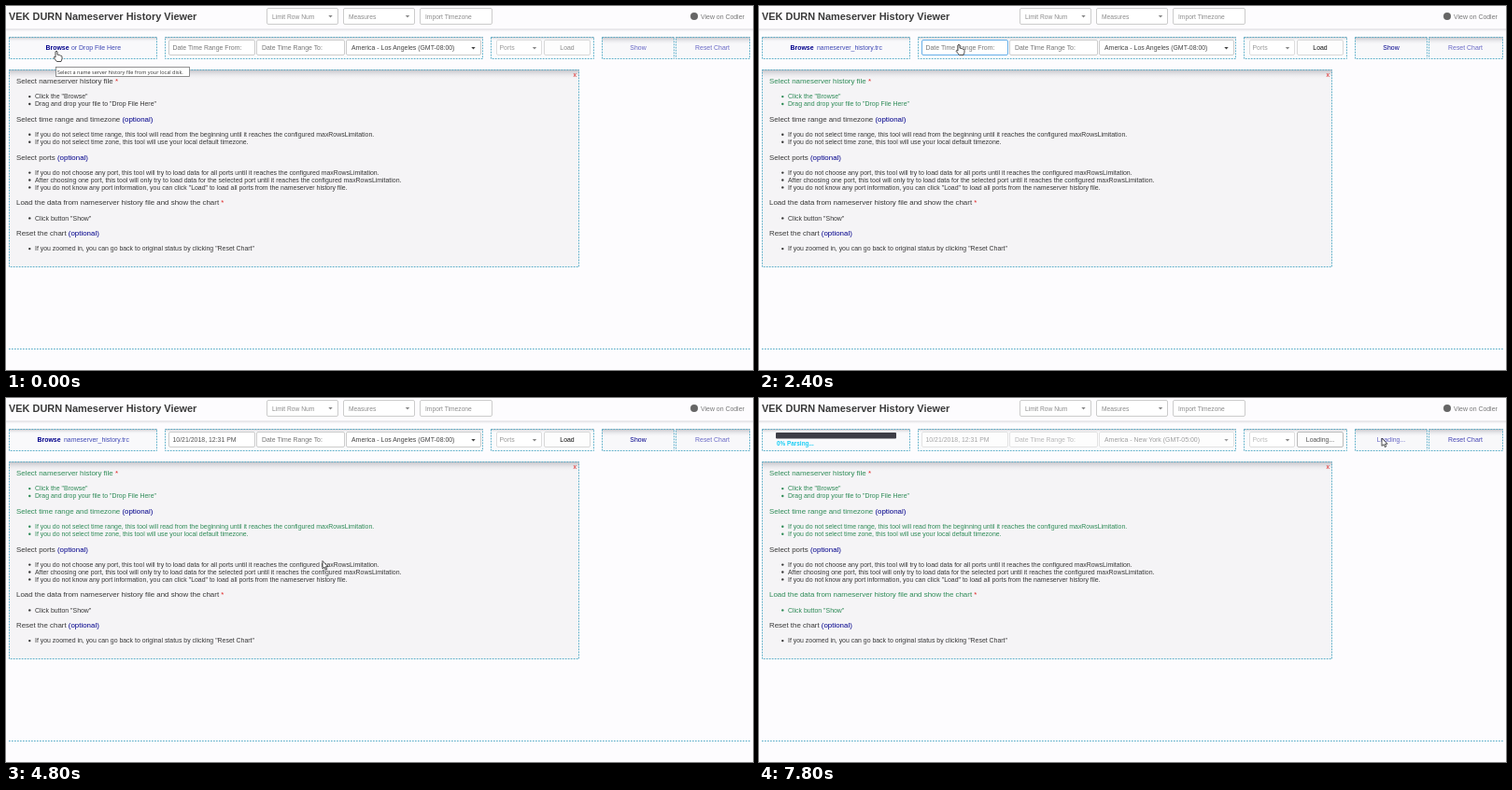
Write an HTML page that moves like this. It is 800 px wide and 390 px high and loops after 8000 ms.

```html
<!DOCTYPE html>
<html lang="en">
<head>
<meta charset="utf-8">
<title>Nameserver History Viewer</title>
<style>
  html, body { margin: 0; width: 100%; height: 100%; overflow: hidden; background: #fdfcfe; }
  svg { display: block; width: 100%; height: 100%; font-family: "Liberation Sans", Arial, sans-serif; }
  .ui { font-family: "Open Sans", "Noto Sans", sans-serif; }
  .serif { font-family: "Liberation Serif", Times, serif; }
  .bold { font-weight: bold; }
  .mid { text-anchor: middle; }
  .end { text-anchor: end; }
  .dash { fill: none; stroke: #58adc8; stroke-dasharray: 1.7 1.3; }
</style>
</head>
<body>
<svg id="stage" viewBox="0 0 800 390"></svg>
<script>
const LOOP = 8000, STEP = 200;
const NAVY = '#00008b', BLUE = '#3f48b5', GREEN = '#2e8b57', INK = '#383838', GREY = '#8c8c8c';
const FILE = 'nameserver_history.trc', STAMP = '10/21/2018, 12:31 PM';
const stage = document.getElementById('stage');

// Moments at which the interface changes
const at = { dialog: 600, pick: 1000, loaded: 1800, focus: 2200, calendar: 2600, month: 3400, day: 4000,
  set: 4600, zones: 5200, type: 6000, chosen: 6800, busy: 7600 };

// time, x, y, shape
const track = [
  [0, 52, 48, 'hand'], [400, 52, 48, 'hand'], [600, 56, 40, 'arrow'], [1000, 62, 16, 'arrow'],
  [1200, 62, 16, 'arrow'], [1600, 289, 217, 'arrow'], [1800, 289, 217, 'arrow'], [2400, 212, 41, 'hand'],
  [2600, 212, 41, 'hand'], [3000, 181, 62, 'hand'], [3400, 181, 62, 'hand'], [3800, 190, 157, 'hand'],
  [4000, 190, 157, 'hand'], [4400, 282, 304, 'hand'], [4600, 282, 304, 'arrow'], [5000, 396, 45, 'arrow'],
  [5200, 402, 46, 'arrow'], [5400, 402, 58, 'beam'], [6400, 402, 58, 'beam'], [6600, 409, 76, 'arrow'],
  [6800, 412, 84, 'arrow'], [7000, 656, 50, 'arrow'], [7200, 667, 43, 'hand'], [7600, 667, 43, 'arrow']
];

const zones = ['Knox IN (GMT-06:00)', 'Kralendijk (GMT-04:00)', 'La Paz (GMT-04:00)', 'Lima (GMT-05:00)',
  'Los Angeles (GMT-08:00)', 'Louisville (GMT-05:00)', 'Lower Princes (GMT-04:00)', 'Maceio (GMT-03:00)',
  'Managua (GMT-06:00)', 'New York (GMT-05:00)', 'North Dakota - New Salem (GMT-06:00)'].map(z => 'America - ' + z);

const rect = (x, y, w, h, fill, stroke = 'none', extra = '') =>
  `<rect x="${x}" y="${y}" width="${w}" height="${h}" fill="${fill}" stroke="${stroke}" ${extra}/>`;
const text = (x, y, s, fill = INK, size = 6.93, cls = '') =>
  `<text x="${x}" y="${y}" fill="${fill}" font-size="${size}" class="${cls}">${s}</text>`;
const path = (d, stroke, width = 1, fill = 'none') =>
  `<path d="${d}" stroke="${stroke}" stroke-width="${width}" fill="${fill}"/>`;
const caret = (x, y, up, fill = '#888') =>
  `<path d="M${x - 2.2} ${y + (up ? 1 : -1)}h4.4l-2.2 ${up ? -2.4 : 2.4}z" fill="${fill}"/>`;
const chevron = (x, y, dx, dy) => path(dx
  ? `M${x + dx} ${y - 3}L${x - dx} ${y}L${x + dx} ${y + 3}`
  : `M${x - 3} ${y + dy}L${x} ${y - dy}L${x + 3} ${y + dy}`, '#222', 1.3);
const field = (x, y, w, h, label, { fill = GREY, stroke = '#ccc', size = 6.93, pad = 6 } = {}) =>
  rect(x + .5, y + .5, w - 1, h - 1, '#fff', stroke, 'rx="1.5"') + text(x + pad, y + h / 2 + 2.8, label, fill, size);
const dashed = (x, y, w, h, fill, shade) =>
  rect(x, y, w, h, fill) + rect(x, y, w, shade, 'url(#shade)') +
  `<rect x="${x + .5}" y="${y + .5}" width="${w - 1}" height="${h - 1}" class="dash"/>`;

const defs = `<defs>
  <linearGradient id="shade" x2="0" y2="1"><stop stop-color="#aaaab2" stop-opacity=".75"/><stop offset="1" stop-color="#e8e8ec" stop-opacity="0"/></linearGradient>
  <filter id="drop" x="-20%" y="-20%" width="140%" height="140%"><feDropShadow dx="0" dy="2" stdDeviation="2.2" flood-opacity=".4"/></filter>
  <clipPath id="list"><rect x="365" y="69" width="143" height="112"/></clipPath>
</defs>`;

function header() {
  const size = 6.7;
  return text(3, 14.5, 'VEK DURN Nameserver History Viewer', '#3a3a3a', 10.93, 'bold') +
    field(279, 2, 77, 18, 'Limit Row Num', { size }) + caret(347.5, 11) +
    field(361, 2, 77, 18, 'Measures', { size }) + caret(430, 11) +
    field(443, 2, 78, 18, 'Import Timezone', { size }) +
    '<circle cx="737" cy="11" r="4" fill="#666"/>' + text(744, 14, 'View on Codler', '#777') +
    rect(0, 24.5, 800, 1, '#dcdce0') + rect(0, 25.5, 800, 3, 'url(#shade)', 'none', 'opacity=".2"') +
    '<path d="M3 367.5H797" class="dash"/>';
}

function toolbar(t) {
  const loaded = t >= at.loaded, busy = t >= at.busy, open = t >= at.zones && t < at.chosen;
  const focused = t >= at.focus && t < at.calendar, dated = t >= at.set;
  const zone = zones[t >= at.chosen ? 9 : 4];
  const hot = loaded && !busy;
  const edge = on => on ? '#66afe9' : '#ccc';
  let s = dashed(3, 33, 159, 24, '#f9f9fb', 5) + dashed(170, 33, 341, 24, '#fbfbfc', 4) +
    dashed(519, 33, 111, 24, '#fbfbfc', 4) + dashed(638, 33, 78, 24, '#f8f8fa', 8) + dashed(717, 33, 80, 24, '#f8f8fa', 8);

  if (busy) s += rect(18, 37, 129, 6.5, '#3d3d46', 'none', 'rx="1"') + text(19, 51, '0% Parsing...', '#16cdf5', 6.4, 'bold');
  else if (loaded) s += text(33.5, 47.3, 'Browse', NAVY, 6.93, 'bold') + text(62, 47.3, FILE, BLUE);
  else s += text(42.5, 47.3, 'Browse', NAVY, 6.93, 'bold') + text(70, 47.3, 'or Drop File Here', BLUE);

  s += `<g opacity="${busy ? .5 : 1}">` +
    field(174, 36, 93, 17, dated ? STAMP : 'Date Time Range From:', { fill: dated ? '#555' : '#777', stroke: edge(focused), pad: 4.5 }) +
    field(268, 36, 95, 17, 'Date Time Range To:', { fill: '#777' }) +
    field(364, 36, 145, 17, zone, { fill: '#444', stroke: edge(open) }) + caret(500.5, 45, open, '#444') + '</g>';
  s += field(525, 36, 49, 17, 'Ports', { fill: busy ? '#bbb' : '#999', stroke: '#ddd', pad: 3.5 }) + caret(566, 45) +
    rect(576.5, 36.5, 49, 16, '#fdfdfd', busy ? '#bbb' : '#d8d8d8', 'rx="1.5"') +
    text(601, 47.3, busy ? 'Loading...' : 'Load', hot ? '#111' : busy ? '#555' : GREY, 6.93, 'mid');
  return s + text(677, 47.3, busy ? 'Loading...' : 'Show', hot ? NAVY : '#6464c4', 6.93, 'mid') +
    text(756.5, 47.3, 'Reset Chart', busy ? '#4545b4' : '#6a6ac6', 6.93, 'mid');
}

function help(t) {
  const must = ' <tspan fill="#e02020">*</tspan>', may = ` <tspan fill="${NAVY}">(optional)</tspan>`;
  const limit = 'until it reaches the configured maxRowsLimitation.';
  const parts = [
    [83, 'Select nameserver history file' + must, at.loaded, 'Click the "Browse"', 'Drag and drop your file to "Drop File Here"'],
    [123.7, 'Select time range and timezone' + may, at.set,
      'If you do not select time range, this tool will read from the beginning ' + limit,
      'If you do not select time zone, this tool will use your local default timezone.'],
    [164.5, 'Select ports' + may, LOOP,
      'If you do not choose any port, this tool will try to load data for all ports ' + limit,
      'After choosing one port, this tool will only try to load data for the selected port ' + limit,
      'If you do not know any port information, you can click "Load" to load all ports from the nameserver history file.'],
    [213.3, 'Load the data from nameserver history file and show the chart' + must, at.busy, 'Click button "Show"'],
    [246, 'Reset the chart' + may, LOOP, 'If you zoomed in, you can go back to original status by clicking "Reset Chart"']
  ];
  let s = dashed(3, 68, 611, 212, '#f5f4f6', 10) + text(607.5, 76, 'x', '#e02020', 7);
  for (const [y, title, done, ...lines] of parts) {
    const ink = t >= done ? GREEN : INK;
    s += text(11, y, title, ink, 7.92);
    lines.forEach((line, i) => {
      const ly = y + 16.4 + i * 7.9;
      s += `<circle cx="25.3" cy="${ly - 2.3}" r="1.2" fill="${ink}"/>` + text(31, ly, line, ink);
    });
  }
  return s;
}

function fileDialog(t) {
  const picked = t >= at.pick, grey = '#555';
  const ui = (x, y, s, fill = '#111', cls = '') => text(x, y, s, fill, 5.7, 'ui ' + cls);
  let s = rect(-8, -12, 389.5, 242.5, '#fff', '#3c97cf', 'filter="url(#drop)"') +
    rect(-8, 191, 389, 39, '#f0f0f0');
  [['Name', 9], ['Date modified', 139], ['Type', 199], ['Size', 259]].forEach(([h, x]) => s += ui(x, 5.3, h, grey));
  [134, 194, 254, 297].forEach(x => s += rect(x, 0, .7, 9, '#e2e2e2'));
  if (picked) s += rect(6.5, 13.5, 287, 9, '#cce8ff', '#b4dcfb');
  s += rect(11.5, 14, 5.5, 8, '#fff', '#7a9cc0', 'stroke-width=".7"') + rect(12.5, 17.5, 4.5, 3, '#3a7fc4') +
    ui(20, 20, FILE) + ui(139, 20, '11/22/2018 3:23 PM', grey) + ui(199, 20, 'Wireshark capture...', grey) +
    ui(291, 20, '66,097 KB', grey, 'end');
  s += ui(-1, 205.3, 'e:') + rect(6.5, 197.5, 267, 11, '#fff', '#999') + ui(9, 205.3, picked ? FILE : '') +
    rect(280.5, 197.5, 92, 11, '#e5e5e5', '#b5b5b5') + ui(282, 205.3, 'Wireshark capture file');
  [269, 368.5].forEach(x => s += path(`M${x - 2} 202l2 2l2 -2`, '#555', .8));
  return s + rect(280.5, 212.5, 42, 11, '#e5f1fb', '#2a8ad8') + rect(315, 212, 1, 11, '#2a8ad8') +
    caret(319.3, 218, false, '#222') + ui(298, 220, 'Open', '#111', 'mid') +
    rect(330.5, 212.5, 42, 11, '#e1e1e1', '#b5b5b5') + ui(351.5, 220, 'Cancel', '#111', 'mid');
}

function calendar(t) {
  const month = t >= at.month ? 9 : 10, chosen = t >= at.day;
  const lead = new Date(Date.UTC(2018, month, 1)).getUTCDay();
  const col = i => 186 + i * 19.85;
  let s = rect(171.5, 53, 148, 263, '#fff', '#ddd', 'filter="url(#drop)" stroke-width=".6"') +
    chevron(182, 63, 1.5, 0) + chevron(309, 63, -1.5, 0) +
    text(225, 66, month === 9 ? 'Oct 2018' : 'Nov 2018', '#222', 7.9) + caret(262.3, 63, false, '#222');
  'Sun Mon Tue Wed Thu Fri Sat'.split(' ').forEach((d, i) => s += text(col(i), 79, d, '#999', 5.5, 'serif mid'));
  s += rect(176, 83.5, 139, .6, '#e4e4e4');
  for (let i = 0; i < 42; i++) {
    const date = new Date(Date.UTC(2018, month, 1 - lead + i));
    const day = date.getUTCDate(), x = col(i % 7), y = 99.5 + Math.floor(i / 7) * 19.8;
    const on = chosen && date.getUTCMonth() === 9 && day === 21;
    if (on) s += `<circle cx="${x}" cy="${y}" r="9.6" fill="#1717a0"/>`;
    s += text(x, y + 2.3, day, on ? '#fff' : date.getUTCMonth() === month ? '#222' : '#d2d2d2', 7, 'serif mid');
  }
  [214, 269, 284, 299].forEach(y => s += rect(172, y, 147, .7, '#dcdcdc'));
  [[228, '12'], [263, '31']].forEach(([x, n]) => s += chevron(x, 224.5, 0, 1.5) + chevron(x, 259.5, 0, -1.5) +
    rect(x - 9.2, 234.5, 18.4, 15, '#fff', '#bbb', 'rx="1.5" stroke-width=".9"') + text(x, 245.3, n, '#222', 9, 'mid'));
  [236.3, 246.3].forEach(y => s += `<circle cx="245.6" cy="${y}" r="1.9" fill="#222"/>`);
  return s + text(176, 278.6, 'From:', BLUE, 6.5, 'serif') + text(315, 278.6, chosen ? STAMP : '', BLUE, 6.4, 'serif end') +
    text(176, 293.4, 'To:', '#222', 6.5, 'serif') +
    text(209, 309.8, 'Cancel', BLUE, 8, 'mid') + text(282.5, 309.8, 'Set', BLUE, 8, 'mid');
}

function zoneList(t) {
  const typed = t < at.type ? '' : ['n', 'new', 'new y', 'new y'][(t - at.type) / STEP];
  const items = zones.filter(z => z.slice(10).toLowerCase().includes(typed)).slice(0, 9);
  const active = typed ? items.findIndex(z => z === zones[9]) : 4;
  const bottom = typed ? 68.5 + items.length * 13 : 182.5;
  let s = rect(364.5, 53.5, 144, bottom - 53.5, '#fff', '#a9bccb') +
    rect(367.5, 55.5, 138, 12, '#fff', '#c4c4c4') + text(370.5, 64, typed, '#444') +
    rect(370.5 + typed.length * 3.7, 57.5, .8, 8, '#222') + '<g clip-path="url(#list)">';
  items.forEach((z, i) => {
    const y = 73.5 + i * 13;
    if (i === active) s += rect(365, y - 6.5, typed ? 143 : 135, 13, '#5379e0');
    s += text(370.5, y + 2.3, z, i === active ? '#fff' : '#555');
  });
  if (!typed) s += rect(500, 69, 8, 112, '#f1f1f1') + rect(501, 100, 6.2, 8.5, '#c1c1c1') +
    caret(504, 73.5, true, '#555') + caret(504, 178, false, '#555');
  return s + '</g>';
}

function cursor(t) {
  let i = track.length - 1;
  while (track[i][0] > t) i--;
  const a = track[i], b = track[i + 1] || a;
  const k = b === a ? 0 : (t - a[0]) / (b[0] - a[0]);
  const shapes = {
    arrow: path('M0 0V8.4L2 6.7L3.3 9.6L4.7 9L3.4 6.2H6Z', '#222', .8, '#fff'),
    hand: path('M1 1Q2 -.6 3 1V4.2Q4.2 3.6 4.9 4.8Q6 4.2 6.6 5.3Q8 5 8 6.6V8.6L7 11.5H2.4L-.8 7.4Q-.8 5.8 1 7Z', '#222', .8, '#fff'),
    beam: path('M-1.6 -4H1.6M0 -4V4M-1.6 4H1.6', '#333', .8)
  };
  return `<g transform="translate(${a[1] + (b[1] - a[1]) * k} ${a[2] + (b[2] - a[2]) * k})">${shapes[a[3]]}</g>`;
}

function scene(t) {
  const during = (from, to) => t >= from && t < to;
  let s = defs + rect(0, 0, 800, 390, '#fdfcfe') + header() + help(t) + toolbar(t);
  if (t < 400) s += rect(53.5, 65.5, 143, 10, '#fff', '#777', 'stroke-width=".8"') +
    text(55, 72.6, 'Select a name server history file from your local disk.', '#333', 5.5, 'ui');
  if (during(at.dialog, at.loaded)) s += fileDialog(t);
  if (during(at.calendar, at.set)) s += calendar(t);
  if (during(at.zones, at.chosen)) s += zoneList(t);
  return s + cursor(t);
}

let shown = -1;
function draw(now) {
  const t = Math.floor(now % LOOP / STEP) * STEP;
  if (t !== shown) stage.innerHTML = scene(shown = t);
  requestAnimationFrame(draw);
}
draw(performance.now());
</script>
</body>
</html>
```
